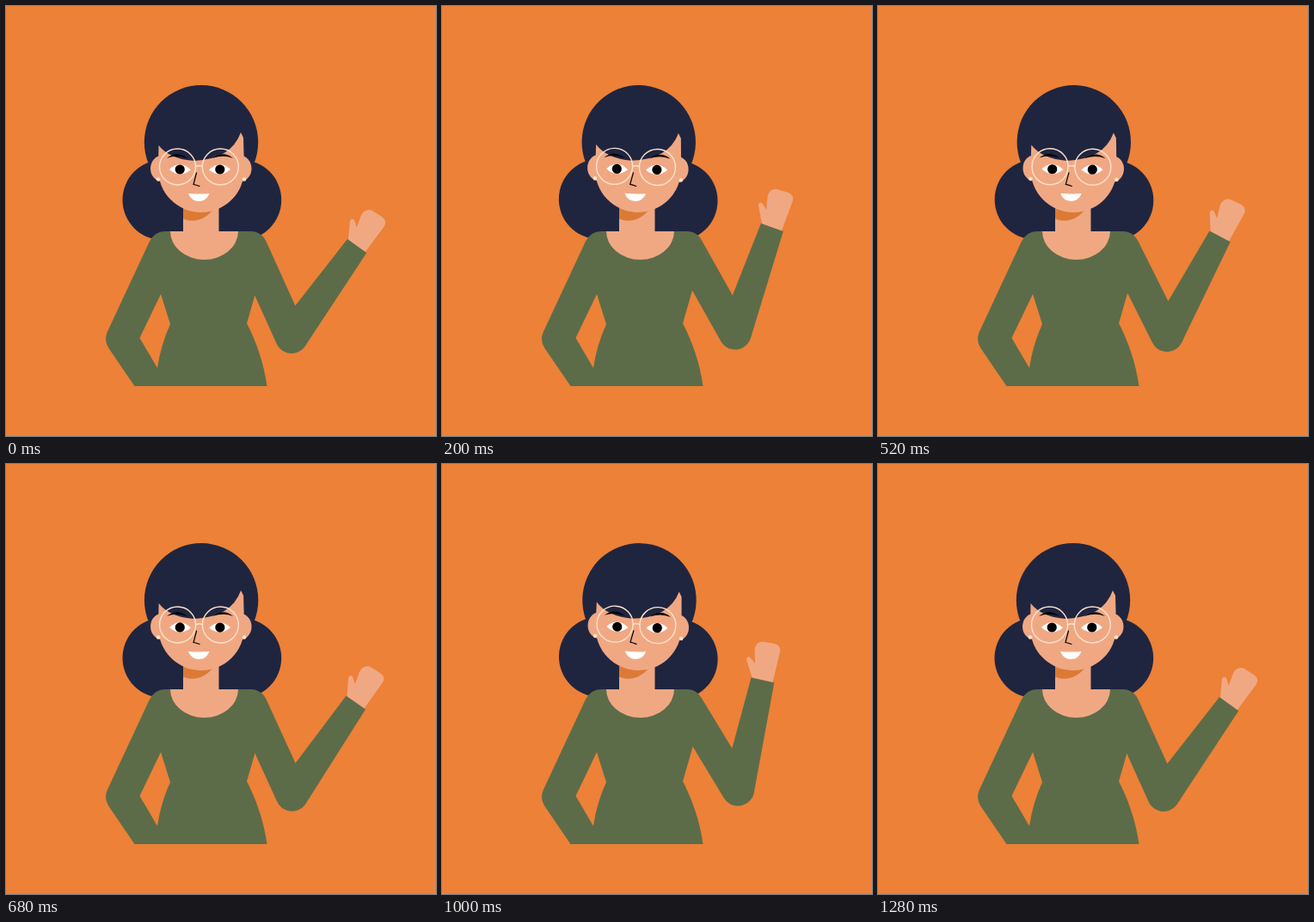
An HTML page that plays this animation: 500x500 px, repeating every 1.32 s.

```html
<!DOCTYPE html>
<html lang="en">
<head>
<meta charset="utf-8">
<title>Waving woman</title>
<style>
  html, body { margin: 0; width: 100%; height: 100%; overflow: hidden; background: #ec8137; }
  svg { display: block; width: 100vw; height: 100vh; }
  .hair { fill: #20253f; }
  .skin { fill: #f0a883; }
  .wool { fill: #5c6c49; }
  .line { fill: none; stroke-linecap: round; }
</style>
</head>
<body>
<svg viewBox="0 0 500 500">
  <g class="hair" data-turn="head">
    <circle cx="182" cy="225.5" r="46.5"/>
    <circle cx="273.7" cy="225.5" r="46.5"/>
    <circle cx="227" cy="158.3" r="66.2"/>
  </g>

  <!-- torso with the bent left arm -->
  <path class="wool" fill-rule="evenodd" d="M185 262H285L297 310L280 369C290 388 300 415 303.5 442H149.500L119.500 398
    Q113.500 388.500 117.800 379L166.800 274Q173 262 185 262Z
    M180 335L155.500 386L176 421Q180 394 191 370Z"/>
  <path class="skin" d="M206 225H247.500V262H270A39.500 33 0 0 1 191 262H206Z"/>
  <path fill="#dc7a35" d="M206 228V247.500Q225 255 241 237V228Z"/>

  <!-- right arm -->
  <g data-turn="upper">
    <path class="line" stroke="#5c6c49" stroke-width="38" d="M285 281L332 385"/>
    <g data-turn="fore">
      <path class="skin" d="M398 272L400 250Q402 245.500 405 249L407.700 257.500L413 243.500
        Q417 235.500 425 237.500L437 245Q443.500 250 440 256L417 287Z"/>
      <path class="wool" d="M347.800 395.500L419.300 287L397 271L316 374.600Z"/>
    </g>
  </g>

  <g data-turn="head">
    <g class="skin">
      <ellipse cx="181" cy="189" rx="13" ry="15"/>
      <ellipse cx="272.500" cy="189" rx="13" ry="15"/>
      <path d="M177.500 162Q190 178 219 180Q262 178 273 147L276 153L277 190A50 50 0 0 1 177 190Z"/>
    </g>
    <g fill="#fbe6c3">
      <circle cx="177" cy="201.500" r="2.300"/>
      <circle cx="277" cy="201.500" r="2.300"/>
    </g>
    <g id="eye">
      <path fill="#fff" d="M190 190Q202 178.500 215 190.500Q202 201 190 190Z"/>
      <circle cx="202.200" cy="190" r="5.600"/>
      <path d="M187 177Q198 167.500 211 177Q198 172.500 187 177Z"/>
    </g>
    <use href="#eye" transform="matrix(-1 0 0 1 451 0)"/>
    <path class="line" stroke="#000" stroke-width="1.200" d="M221.500 194L218 207.500Q221 208 225 209.500"/>
    <path fill="#fff" d="M212 218Q224.500 219 236.500 218Q233 227 224.500 227Q215.500 227 212 218Z"/>
    <g class="line" stroke="#fbe3cd" stroke-width="1.400">
      <circle cx="199.500" cy="187" r="21"/>
      <circle cx="249.300" cy="187" r="21"/>
      <path d="M220.500 186.500Q224.500 185 228.500 186.500"/>
    </g>
  </g>
</svg>
<script>
  const LOOP = 1320, STEP = 40, HALF_WAVE = 320;

  // Full swing in degrees and pivot of each joint.
  const joints = {
    head: [1.8, 228, 240],
    upper: [-7.2, 285, 281],
    fore: [-16.8, 332, 385]
  };
  const parts = document.querySelectorAll("[data-turn]");
  const smooth = x => x * x * (3 - 2 * x);

  function draw(now) {
    const time = Math.floor((now % LOOP) / STEP) * STEP;
    const phase = (time / HALF_WAVE) % 2;
    const swing = smooth(1 - Math.abs(1 - phase));
    for (const part of parts) {
      const [angle, x, y] = joints[part.dataset.turn];
      part.setAttribute("transform", `rotate(${angle * swing} ${x} ${y})`);
    }
  }

  const start = performance.now();
  function tick() {
    draw(performance.now() - start);
    requestAnimationFrame(tick);
  }
  tick();
</script>
</body>
</html>
```
